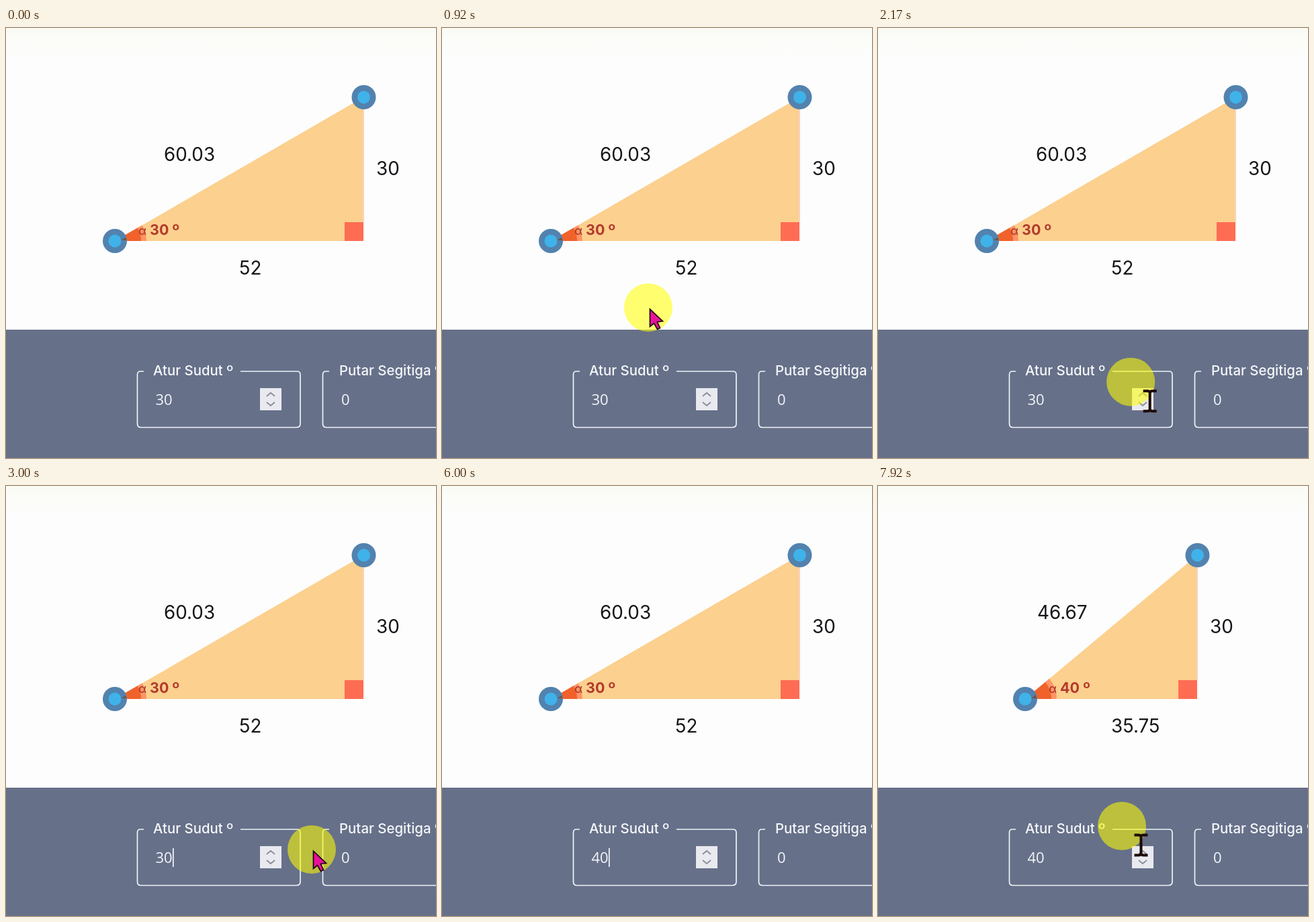
An HTML page that plays this animation: 640 px wide and 640 px high, repeating every 8000 ms.

```html
<!DOCTYPE html>
<html lang="id">
<head>
<meta charset="utf-8">
<title>Segitiga</title>
<style>
  html, body { margin: 0; width: 100%; height: 100%; overflow: hidden; background: #fdfdfd; }
  svg { display: block; width: 100%; height: 100%; }
  text { font-family: Inter, sans-serif; }
  .size { font-size: 27.8px; fill: #16161a; }
  .angle { font-size: 21.5px; font-weight: 700; fill: #b23a2c; }
  .legend { font-size: 20.4px; font-weight: 500; fill: #f6f7fa; }
  .value { font: 22px "Open Sans", "Noto Sans", sans-serif; fill: #f3f5f8; }
  .value.hint { fill: #a3aab6; }
  .line { fill: none; stroke: #eef3f6; stroke-width: 1.7; }
</style>
</head>
<body>
<svg viewBox="0 0 640 640">
  <defs>
    <linearGradient id="glow" x2="0" y2="1">
      <stop stop-color="#fbfbf5"/><stop offset="1" stop-color="#fdfdfd"/>
    </linearGradient>
  </defs>
  <rect width="640" height="640" fill="#fdfdfd"/>
  <rect width="640" height="42" fill="url(#glow)"/>
  <rect y="449" width="640" height="191" fill="#667089"/>

  <path id="tri" fill="#fcd08e"/>
  <path id="side" stroke="#f8d2c0" stroke-width="2"/>
  <rect id="corner" y="289" width="28" height="28" fill="#ff6c54"/>
  <path id="outer" fill="#fd9566"/>
  <path id="inner" fill="#f0622a"/>
  <g id="knobA"><circle r="18" fill="#5282ae"/><circle r="9.5" fill="#40b2ea"/></g>
  <g id="knobB"><circle r="18" fill="#5282ae"/><circle r="9.5" fill="#40b2ea"/></g>
  <path id="tip" fill="#6b5a4a"/>
  <text id="alpha" class="angle" y="308" style="font-size:18px;font-weight:500">α</text>
  <text id="deg" class="angle" y="308"></text>
  <text id="hyp" class="size" y="198"></text>
  <text id="opp" class="size" y="219">30</text>
  <text id="adj" class="size" x="347" y="367"></text>

  <path class="line" d="M205 511H200Q195.500 511 195.500 516V589Q195.500 594.500 201 594.500H432Q438 594.500 438 589V516Q438 511 433 511H349"/>
  <path class="line" d="M481 511H476Q471.500 511 471.500 516V589Q471.500 594.500 477 594.500H650"/>
  <text class="legend" x="219" y="517">Atur Sudut º</text>
  <text class="legend" x="496" y="517">Putar Segitiga º</text>
  <text id="value" class="value" x="222.500" y="561"></text>
  <text class="value" x="499" y="561">0</text>
  <rect id="caret" y="539" width="1.700" height="28" fill="#f3f5f8"/>
  <rect x="378" y="536" width="32" height="33" fill="#e9eaf0"/>
  <path d="M388 548l6-5 6 5M388 557l6 5 6-5" fill="none" stroke="#8c8e98" stroke-width="2"/>

  <circle id="halo" r="36" fill="#ff0" fill-opacity=".56"/>
  <path id="arrow" d="M0 0V26L6 21 11 30 15 28 11 19 19 18Z" fill="#e8129a" stroke="#180810" stroke-width="1.700"/>
  <g id="beam">
    <path d="M-10-15H-4Q0-15 0-12Q0-15 4-15H10M0-13V13M-10 15H-4Q0 15 0 12Q0 15 4 15H10" fill="none" stroke="#1c0b05" stroke-width="4"/>
    <circle id="click" r="5" fill="#667089" stroke="#7fb53a" stroke-width="4"/>
  </g>
</svg>
<script>
const LOOP = 8000, STEP = 1000 / 12, BLINK = 530, HINT = '0º';
const el = {};
document.querySelectorAll('[id]').forEach(e => el[e.id] = e);
const set = (id, attrs) => { for (const k in attrs) el[id].setAttribute(k, attrs[k]); };
const show = (id, on) => set(id, { visibility: on ? 'visible' : 'hidden' });
const move = (id, x, y) => set(id, { transform: `translate(${x} ${y})` });

// time, field text, caret x
const edits = [
  [0, '30', null], [1570, '30', 248], [3820, '3', 235.5],
  [3990, HINT, 222.5], [4320, '4', 235.5], [4820, '40', 248]
];
// time, x, y of the pointer in each visible stretch
const paths = [
  [[410, 690, 400], [620, 500, 426], [900, 307, 416], [1000, 307, 416], [1420, 273, 512],
   [1740, 273, 512], [2330, 400, 530], [2750, 455, 541], [3820, 455, 541]],
  [[6240, 455, 541], [6500, 455, 541], [7750, 363, 506], [8000, 363, 506]]
];

function pointer(t) {
  const p = paths.find(p => t >= p[0][0] && t < p.at(-1)[0]);
  if (!p) return null;
  const i = p.findIndex(k => k[0] > t), a = p[i - 1], b = p[i];
  const u = (t - a[0]) / (b[0] - a[0]), s = u * u * (3 - 2 * u);
  return [a[1] + (b[1] - a[1]) * s, a[2] + (b[2] - a[2]) * s];
}

function sector(x, y, r, deg) {
  const a = deg * Math.PI / 180;
  return `M${x} ${y}h${r}A${r} ${r} 0 0 0 ${x + r * Math.cos(a)} ${y - r * Math.sin(a)}Z`;
}

function drawTriangle(deg, left, right, hyp, adj, hypX) {
  const base = 317, top = 103;
  set('tri', { d: `M${left} ${base}L${right} ${top}V${base}Z` });
  set('side', { d: `M${right} ${top}V${base - 28}` });
  set('corner', { x: right - 28 });
  set('outer', { d: sector(left, base, 47, deg) });
  set('inner', { d: sector(left, base, 39, deg) });
  set('tip', { d: sector(left + 9, base - 1, 8, deg) });
  move('knobA', left, base);
  move('knobB', right + .5, top);
  set('alpha', { x: left + 35 });
  set('deg', { x: left + 52 });
  set('opp', { x: right + 19 });
  set('hyp', { x: hypX });
  el.deg.textContent = deg + ' º';
  el.hyp.textContent = hyp;
  el.adj.textContent = adj;
}

function frame(now) {
  const t = Math.floor((now % LOOP + 5) / STEP) * STEP % LOOP;
  if (t < 6240) drawTriangle(30, 162, 532, '60.03', '52', 235);
  else drawTriangle(40, 219, 475, '46.67', '35.75', 237);

  const [since, text, caretX] = edits.findLast(e => e[0] <= t);
  el.value.textContent = text;
  el.value.classList.toggle('hint', text === HINT);
  show('caret', caretX !== null && Math.floor((t - since) / BLINK) % 2 === 0);
  set('caret', { x: caretX ?? 0 });

  const p = pointer(t), inField = p && p[0] < 430 && p[1] > 480;
  show('halo', p);
  show('arrow', p && !inField);
  show('beam', inField);
  show('click', inField && t > 1570 && t < 1740);
  if (p) {
    const [x, y] = p;
    set('halo', { cx: x, cy: y });
    move('arrow', x + 2.5, y + 2.5);
    move('beam', x + 28.5, y + 28.5);
  }
  requestAnimationFrame(frame);
}
requestAnimationFrame(frame);
</script>
</body>
</html>
```
